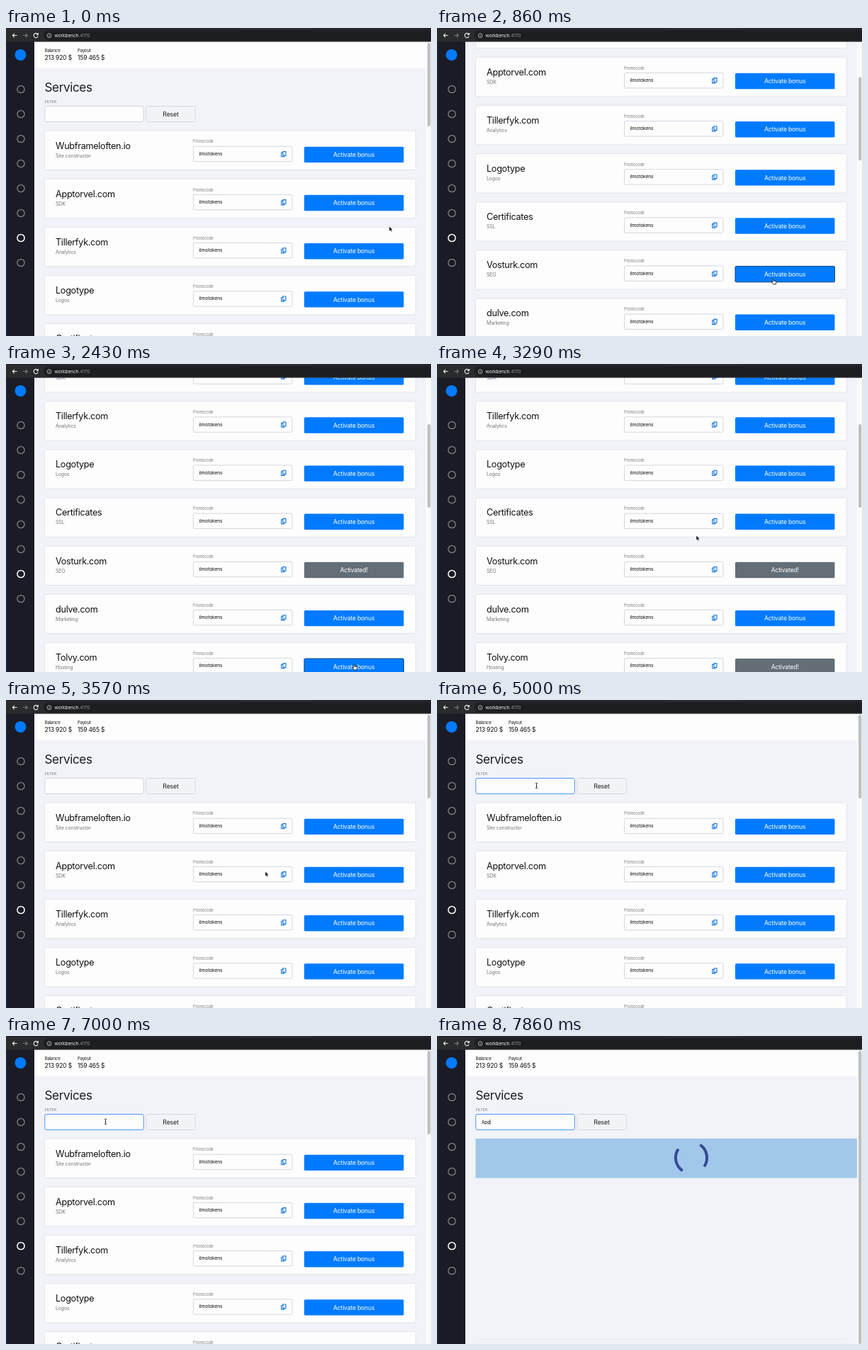
Recreate the animation shown at these times as an HTML page. Size 600 by 435 pixels, loop 8 s.

```html
<!DOCTYPE html>
<html lang="en">
<head>
<meta charset="utf-8">
<title>Services</title>
<style>
  html, body { margin: 0; width: 100%; height: 100%; overflow: hidden; background: #f2f3f8; }
  svg { display: block; width: 100vw; height: 100vh; }
  text { font-family: Inter, Roboto, sans-serif; letter-spacing: -.025em; white-space: pre; }
</style>
</head>
<body>
<svg id="stage" viewBox="0 0 600 435"></svg>
<script>
const LOOP = 8000, STEP = 1000 / 7;
const TOP = 145, PITCH = 68.15;
const BLUE = '#007bff', GREY = '#636e77';

const services = [
  ['Wubframeloften.io', 'Site constructor'],
  ['Apptorvel.com', 'SDK'],
  ['Tillerfyk.com', 'Analytics'],
  ['Logotype', 'Logos'],
  ['Certificates', 'SSL'],
  ['Vosturk.com', 'SEO'],
  ['dulve.com', 'Marketing'],
  ['Tolvy.com', 'Hosting']
];

// Step at which each clicked button is pressed and then done.
const clicks = { 5: [6, 8], 7: [17, 18] };

// [step, value...]
const scrollKeys = [[0, 0], [4, 172], [9, 172], [11, 188.5], [13, 188.5], [15, 228.7], [23, 228.7], [24, 60], [25, 0]];
const pointerKeys = [
  [0, 541, 280], [1, 541, 280], [3, 537, 285], [6, 474, 354], [8, 474, 354],
  [11, 500.5, 376], [14, 500.5, 376], [16, 491, 424], [18, 491, 424],
  [22, 366, 242], [27, 366, 242], [31, 140.5, 121]
];
const FOCUS = 32, TYPE = 50, LOAD = 52;

const text = (x, y, size, fill, str, extra = '') =>
  `<text x="${x}" y="${y}" font-size="${size}" fill="${fill}" ${extra}>${str}</text>`;
const rect = (x, y, w, h, fill, extra = '') =>
  `<rect x="${x}" y="${y}" width="${w}" height="${h}" fill="${fill}" ${extra}/>`;
const path = (d, stroke, width = 1, extra = '') =>
  `<path d="${d}" fill="none" stroke="${stroke}" stroke-width="${width}" ${extra}/>`;
const MID = 'text-anchor="middle"';

const card = ([name, kind], i) => `<g transform="translate(0 ${TOP + i * PITCH})">
  ${rect(54.5, 0, 524, 55.5, '#fdfdfe', 'rx="2" stroke="#dfe3ea" stroke-width=".9"')}
  ${text(70, 25.6, 12.7, '#111', name)}
  ${text(70, 37.6, 7, '#74777c', kind)}
  ${text(264, 17.4, 5.5, '#7c7f84', 'Promocode')}
  ${rect(264.5, 22.2, 139.5, 21.5, '#fdfdfe', 'rx="1.5" stroke="#cdd3da" stroke-width=".9"')}
  ${text(272.5, 35, 6.8, '#111', 'ilmotokens')}
  ${path('M391 29.5h4v5.6h-4z M391 31h-2.2v5.7h4v-1.6', '#0b72d9', 1.1)}
  ${rect(421, 22.7, 140.5, 22.4, BLUE, `rx="1.5" id="btn${i}"`)}
  ${text(491.2, 37.2, 8.7, '#fff', 'Activate bonus', `${MID} id="lbl${i}"`)}
</g>`;

const page = `
  ${rect(40, 19, 553, 38, '#fdfdfe')}
  ${text(54.7, 34, 6.1, '#111', 'Balance')}
  ${text(54.5, 45.2, 8.6, '#111', '213 920 $')}
  ${text(101, 34, 6.1, '#111', 'Payout')}
  ${text(101, 45.2, 8.6, '#111', '159 465 $')}
  ${text(54.5, 90, 17.2, '#1c1d20', 'Services')}
  ${text(54.7, 106, 5.3, '#7c7f84', 'FILTER')}
  ${rect(54.8, 110.5, 139.5, 22, '#fdfdfe', 'rx="2" stroke-width="1" id="field"')}
  ${text(63, 124, 6.5, '#111', '', 'id="query"')}
  ${rect(62.6, 118, .8, 7.2, '#222', 'id="caret"')}
  ${rect(197.8, 110.5, 69.5, 22, '#f1f3f7', 'rx="2" stroke="#d0d5dc" stroke-width=".9"')}
  ${text(232.5, 124.7, 8.9, '#222', 'Reset', MID)}
  <g id="list">${services.map(card).join('')}</g>
  <g id="loader">
    ${rect(54.5, 144.8, 539, 55.8, '#a1c8ea')}
    ${path('M-15.6-15.6A22 22 0 0 0-15.6 15.6M15.6-15.6A22 22 0 0 1 15.6 15.6', '#354a94', 4, 'id="spin"')}
    ${path('M54.5 428.5H578', '#e8eaf0')}
  </g>`;

const menu = Array.from({ length: 8 }, (_, i) =>
  `<circle cx="21" cy="${86.5 + 35 * i}" r="5.1" fill="none" stroke="${i === 6 ? '#fff' : '#74757d'}" stroke-width="1.5"/>`).join('');

const chrome = `
  ${rect(0, 0, 600, 19.5, '#2a2b2e')}
  ${rect(0, 0, 329, 1, '#1d1e21')}${rect(432, 0, 168, 1, '#1d1e21')}
  ${rect(53, 3, 560, 15, '#1d1e21', 'rx="7.5"')}
  ${path('M15.5 10.5H9.5M12 7.8L9.3 10.5L12 13.2', '#eee', 1.1)}
  ${path('M24 10.5H30M27.6 7.8L30.3 10.5L27.6 13.2', '#77787c', 1.1)}
  ${path('M45 9A3.1 3.1 0 1 0 45.2 11.6M45.4 7V9.4H43', '#eee', 1.1)}
  <circle cx="61" cy="10.7" r="2.9" fill="none" stroke="#ccc" stroke-width=".8"/>
  ${path('M61 10.2V12.3M61 8.8V9.5', '#ccc', .8)}
  ${text(68.5, 13.1, 6.7, '#f1f1f1', 'workbench<tspan fill="#8f9196">:4170</tspan>')}`;

const stage = document.getElementById('stage');
stage.innerHTML = `
  ${rect(0, 0, 600, 435, '#f2f3f8')}
  <g id="page">${page}</g>
  ${rect(593, 19, 7, 416, '#fafafa')}
  ${rect(595, 21, 4.3, 118, '#c0c0c1', 'rx="2" id="thumb"')}
  ${rect(2, 19, 38, 416, '#1b1b25')}
  ${rect(0, 19, 2, 416, '#16233a')}
  <circle cx="20.5" cy="38" r="8" fill="${BLUE}"/>
  ${menu}${chrome}
  <g id="pointer" stroke-linejoin="round">
    <path id="arrow" d="M0 0V7.2L1.7 5.7L2.8 8.2L4 7.7L2.9 5.2H5.1Z" fill="#111" stroke="#fff" stroke-width=".6"/>
    <path id="hand" d="M0 .5Q.7-.5 1.3.5V3L4.4 3.8Q5 4 4.9 4.8L4.2 8H.6L-1.8 4.9Q-1.7 4-.8 4.4L0 5Z" fill="#fff" stroke="#111" stroke-width=".8"/>
    <path id="beam" d="M-1.6-3.8Q0-3.8 0-2.8Q0-3.8 1.6-3.8M0-2.8V2.8M-1.6 3.8Q0 3.8 0 2.8Q0 3.8 1.6 3.8M-.8.8H.8" fill="none" stroke="#222" stroke-width=".9"/>
  </g>`;

const $ = id => document.getElementById(id);
const show = (id, on) => $(id).setAttribute('display', on ? 'inline' : 'none');
const set = (id, attrs) => {
  for (const key in attrs) $(id).setAttribute(key, attrs[key]);
};

function sample(keys, n) {
  const next = keys.findIndex(k => k[0] > n);
  if (next < 0) return keys[keys.length - 1].slice(1);
  const a = keys[next - 1], b = keys[next];
  const u = (n - a[0]) / (b[0] - a[0]), e = u * u * (3 - 2 * u);
  return a.slice(1).map((v, i) => v + (b[i + 1] - v) * e);
}

function drawPointer(n, scroll) {
  const [x, y] = sample(pointerKeys, n);
  const row = (y + scroll - TOP + PITCH) % PITCH;
  const hand = x > 421 && x < 561 && row > 22.7 && row < 45.1;
  const beam = x > 55 && x < 194 && y > 110 && y < 133;
  set('pointer', { transform: `translate(${x} ${y})` });
  show('pointer', n < TYPE);
  show('hand', hand);
  show('beam', beam);
  show('arrow', !hand && !beam);
}

function drawField(n) {
  const focused = n >= FOCUS, typing = n >= TYPE;
  set('field', { stroke: focused ? '#4c97ee' : '#cfd6df' });
  $('query').textContent = 'App'.slice(0, Math.max(0, n - TYPE + 1));
  const width = typing ? $('query').getComputedTextLength() : 0;
  set('caret', { x: 62.6 + width });
  show('caret', typing || (focused && (n - FOCUS) % 7 < 3));
}

function draw(time) {
  const n = Math.floor(((time % LOOP) + 5) / STEP) % 56;
  const [scroll] = sample(scrollKeys, n);
  const loading = n >= LOAD;

  set('page', { transform: `translate(0 ${-scroll})` });
  set('thumb', { y: 21 + scroll * .28, height: loading ? 414 : 118 });
  for (const i in clicks) {
    const [press, done] = clicks[i];
    const pressed = n >= press && n < done;
    set('btn' + i, { fill: n >= done ? GREY : BLUE, stroke: pressed ? '#0b4386' : 'none' });
    $('lbl' + i).textContent = n >= done ? 'Activated!' : 'Activate bonus';
  }
  show('list', !loading);
  show('loader', loading);
  set('spin', { transform: `translate(359 172) rotate(${-11 + (n - 55) * 360 / 7})` });
  drawField(n);
  drawPointer(n, scroll);
}

const start = performance.now();
function tick() {
  draw(performance.now() - start);
  requestAnimationFrame(tick);
}
tick();
</script>
</body>
</html>
```
